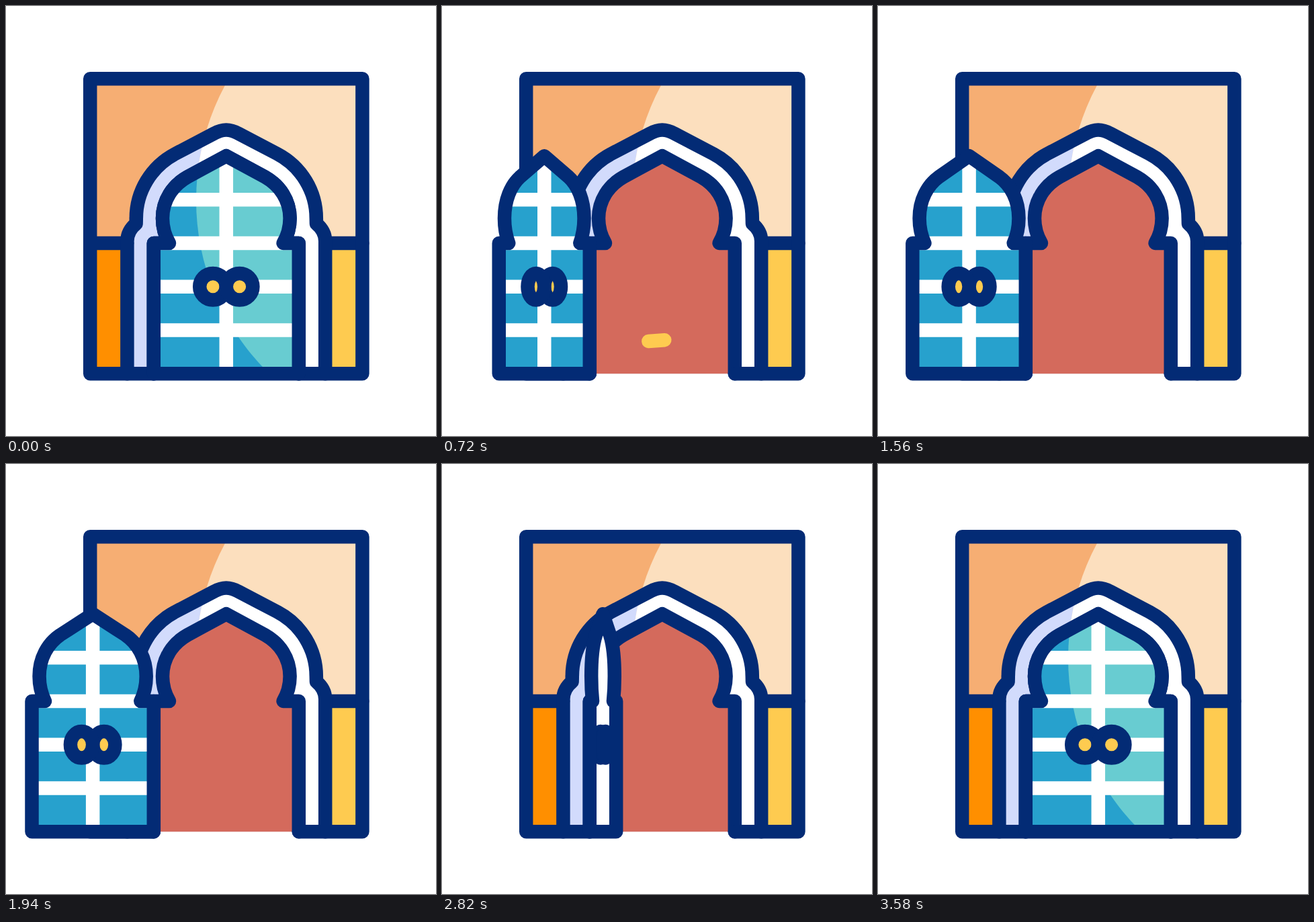
An HTML page for the animation above (3600 ms loop, 640 by 640 pixels).

```html
<!DOCTYPE html>
<html lang="en">
<head>
<meta charset="utf-8">
<title>Door</title>
<style>
  html, body { margin: 0; width: 100%; height: 100%; overflow: hidden; background: #fff; }
  svg { display: block; width: 100vw; height: 100vh; }
  .line { fill: none; stroke: #032b75; stroke-width: 20.5; stroke-linecap: round; stroke-linejoin: round; }
  .bar { fill: none; stroke: #fff; stroke-width: 20.5; }
  .knob { fill: #fecb50; stroke: #032b75; stroke-width: 20.5; }
</style>
</head>
<body>
<svg viewBox="0 0 640 640">
  <defs>
    <clipPath id="light"><circle cx="644" cy="289" r="361"/></clipPath>
    <clipPath id="leaf"><path class="door"/></clipPath>
  </defs>

  <g id="shade">
    <path fill="#f6ae73" d="M125 108H530V353H125Z"/>
    <path fill="#ff8f00" d="M125 353H530V547H125Z"/>
    <path class="arch" fill="#d2dbfc"/>
  </g>
  <g clip-path="url(#light)">
    <path fill="#fcdfbe" d="M125 108H530V353H125Z"/>
    <path fill="#fecb50" d="M125 353H530V547H125Z"/>
    <path class="arch" fill="#fff"/>
  </g>
  <path class="opening" fill="#d46a5c"/>
  <path id="dash" fill="none" stroke="#fecb50" stroke-width="20.5" stroke-linecap="round"/>

  <g class="line">
    <path d="M125.2 353H180.2M475.4 353H530.4"/>
    <path class="arch"/>
    <path class="opening"/>
    <path d="M219.8 547.3H125.2V108.2H530.4V547.3H435.8"/>
  </g>

  <g clip-path="url(#leaf)">
    <path fill="#27a1cd" d="M0 0H640V640H0Z"/>
    <circle cx="644" cy="289" r="361" fill="#68ccd1"/>
    <path class="bar" d="M0 288.2H640M0 353H640M0 417.8H640M0 482.4H640"/>
    <path class="bar" id="post"/>
  </g>
  <ellipse class="knob" cy="417.8" ry="19.8"/>
  <ellipse class="knob" cy="417.8" ry="19.8"/>
  <path class="door line"/>
</svg>
<script>
const LOOP = 3600, HINGE = 219.8, MID = 327.8, REACH = 216;
const all = q => document.querySelectorAll(q);
const setPath = (q, d) => all(q).forEach(e => e.setAttribute('d', d));
const mirror = x => 2 * MID - x;

// Keyhole-shaped outline; fx maps each x so strokes keep their weight.
function keyhole(fx) {
  const p = (x, y) => fx(x) + ' ' + y + ' ';
  const r = (x, y) => p(mirror(x), y);
  return 'M' + p(219.8, 547.3) + 'L' + p(219.8, 353) + 'L' + p(243, 353) +
    'C' + p(236, 341) + p(233, 329) + p(233, 316) +
    'C' + p(233, 289) + p(248, 267) + p(270, 254.5) +
    'L' + p(MID, 223.2) + 'L' + r(270, 254.5) +
    'C' + r(248, 267) + r(233, 289) + r(233, 316) +
    'C' + r(233, 329) + r(236, 341) + r(243, 353) +
    'L' + r(219.8, 353) + 'L' + r(219.8, 547.3);
}

function outerArch() {
  const p = (x, y) => x + ' ' + y + ' ';
  const r = (x, y) => p(mirror(x), y);
  return 'M' + p(180.4, 547.3) + 'V350' +
    'C' + p(180.4, 340) + p(185, 331) + p(193.6, 324) + 'L' + p(193.8, 316) +
    'C' + p(193.8, 276) + p(216, 239) + p(252, 220) + 'L' + p(310, 189.7) +
    'C' + p(316, 186.3) + p(322, 184.5) + p(MID, 184.5) +
    'C' + r(322, 184.5) + r(316, 186.3) + r(310, 189.7) + 'L' + r(252, 220) +
    'C' + r(216, 239) + r(193.8, 276) + r(193.8, 316) + 'L' + r(193.6, 324) +
    'C' + r(185, 331) + r(180.4, 340) + r(180.4, 350) + 'V547.3';
}

// Signed width of the door: 1 closed, negative when swung past the hinge.
function swing(t) {
  if (t < 606) return 1 - 1.603 * (t / 606) ** 3;
  if (t < 2250) {
    const u = (t - 606) / 1644;
    return -0.603 - 0.277 * (1.15 * u - 0.15 * u ** 3);
  }
  if (t < 2600) return -0.88 + 0.12 * ((t - 2250) / 350) ** 2;
  return 1 - 1.76 * (1 - Math.min(1, (t - 2600) / 980)) ** 3;
}

function dashPath(t) {
  const u = (t - 640) / 160;
  if (u <= 0 || u >= 1) return '';
  const at = k => {
    const x = 295 + 48 * k;
    return x + ' ' + (499 - (x - 307) * 0.075);
  };
  return 'M' + at(u * u) + 'L' + at(1 - (1 - u) ** 2);
}

const knobs = all('.knob');

function draw(t) {
  const s = swing(t);
  const fx = x => HINGE + (x - HINGE) * s;
  setPath('.door', keyhole(fx) + 'Z');
  setPath('#post', 'M' + fx(MID) + ' 0V640');
  setPath('#dash', dashPath(t));
  [308, 347.6].forEach((x, i) => {
    knobs[i].setAttribute('cx', fx(x));
    knobs[i].setAttribute('rx', Math.max(0.01, 19.8 * Math.abs(s)));
  });
}

setPath('.arch', outerArch());
setPath('.opening', keyhole(x => x));
draw(0);

const start = performance.now();
function tick() {
  draw((performance.now() - start) % LOOP);
  requestAnimationFrame(tick);
}
requestAnimationFrame(tick);
</script>
</body>
</html>
```
